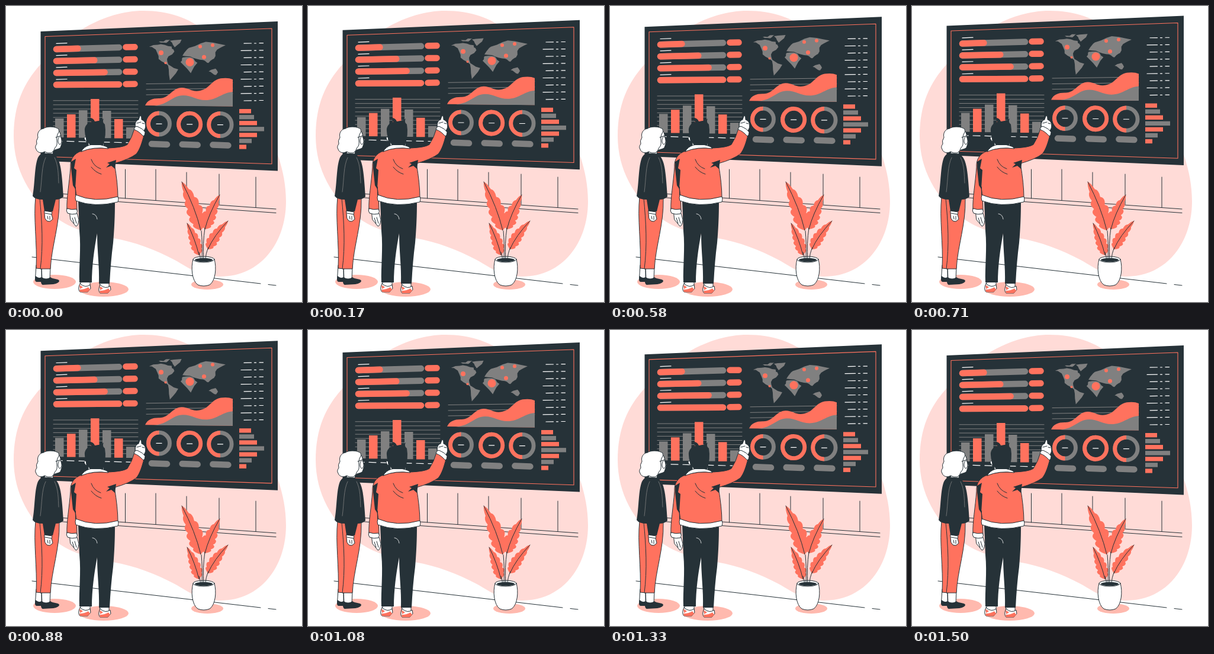
Write an HTML page that moves like this. It is 500x500 px and loops after 1540 ms.

```html
<!DOCTYPE html>
<html lang="en">
<head>
<meta charset="utf-8">
<title>Dashboard wall</title>
<style>
  html, body { margin: 0; width: 100%; height: 100%; overflow: hidden; background: #fff; }
  svg { display: block; width: 100%; height: 100%; }
  path, line, ellipse { stroke-linecap: round; stroke-linejoin: round; }
  .coral { fill: #ff725e; }
  .grey { fill: #808080; }
  .dark { fill: #263238; }
  .white { fill: #fff; }
  .shade { fill: #ffb9ae; }
  .ink { stroke: #263238; stroke-width: 1; }
  .line { fill: none; }
  .chalk { stroke: #fff; stroke-width: 1.2; }
  .rule { stroke: #808080; stroke-width: 1; }
</style>
</head>
<body>
<svg viewBox="0 0 500 500">
  <path fill="#ffdbd7" d="M232 8C275 8 307 20 337 42C390 78 420 150 440 195C452 235 473 275 473 330C473 400 430 457 362 457C327 457 310 443 285 429C250 411 220 399 180 392C140 385 110 376 85 358C40 325 13 275 13 220C13 166 30 130 58 99C100 50 165 8 232 8"/>

  <path class="ink line" d="M201.500 276V325M253 276V328M305 281V331M360 284V335M422 289V340M90 317L456 343M90 323.500L456 349.500M44 424L430 469M443 470.500L456 472"/>
  <g class="shade">
    <ellipse cx="82" cy="466" rx="36" ry="12"/>
    <ellipse cx="165" cy="478.500" rx="42" ry="12.500"/>
    <ellipse cx="340" cy="470.500" rx="27" ry="8.500"/>
  </g>

  <g id="board">
    <path class="dark" d="M58.500 43L459 26V278.500L58.500 261.500Z"/>
    <path class="line" stroke="#ff725e" stroke-width="1.100" d="M66 51.500L449 38V266.700L66 254.500Z"/>
    <g id="charts"></g>
    <path id="map" class="grey"/>
    <g id="spots" class="coral"></g>
    <path class="rule" d="M237 131.500l146 -2M237 141l146 -2M237 150l146 -2"/>
    <path class="coral" d="M235 168C239 159 247 156 258 156C276 157 280 138 297 138C309 138 314 146 328 143C346 139 347 123 366 122Q376 121 383 124V169.500Z"/>
    <path class="grey" d="M250 168.500C274 167 281 151 299 151C315 151 322 160 340 159C359 157 364 147 383 145V169.500Z"/>
  </g>

  <g id="plant"></g>
  <path class="white ink" d="M316 428C312 442 314 464 324 471Q334 475 344 471C354 464 356 442 352 428Z"/>
  <ellipse class="white ink" cx="334" cy="428" rx="18" ry="5"/>
  <ellipse class="dark" cx="334" cy="429" rx="15" ry="3.300"/>
  <path class="ink line" d="M331 430Q332 400 330 380M334 430Q332 400 336 375M337 430Q337 418 342 408M328 430Q329 422 326 416"/>

  <g id="woman">
    <path class="white ink" d="M51 438L49.500 460H60V440ZM60 440L61 462H74L75 440Z"/>
    <path class="dark" d="M50 456C48 462 49 466 52 466H62L60 458Q55 461 50 456ZM60 458C58 465 59 470 62 471L80 470Q90 468 90 464C88 460 79 462 75 458Q68 463 60 458Z"/>
    <path class="coral ink" d="M50 322C46 360 53 400 51 443L61 444L70 325Z"/>
    <path class="coral ink" d="M57 325C61 365 63 405 58 444H75C77 405 91 370 90 325Z"/>
    <path class="dark" d="M62 249L79 250C92 255 94 275 97 322Q92 327 84 327L79 347H65L62 327Q49 327 45 321C49 300 48 270 54 256Q57 250 62 249Z"/>
    <path class="line" stroke="#808080" stroke-width=".8" d="M67 256C60 270 61 292 58 314M82 256C89 270 88 285 89 299"/>
    <path class="white ink" d="M65 346L78 348L77 352L79 360L74 364L69 363L66 359ZM66 350L77 352M70 355L71 360M74 355V361"/>
    <path class="dark" d="M61 245H79V253H60Z"/>
    <path class="white ink" d="M82 210L91 213L95 230L92 239C88 243 84 241 80 245L79 250L65 249Z"/>
    <path class="white ink" d="M63 207C69 203 83 203 89 208Q91 212 87 217Q85 221 86 228Q87 236 83 239Q81 245 77 248Q69 249 65 246C60 250 52 247 51 242Q48 238 52 233Q50 228 54 222C52 215 56 208 63 207Z"/>
    <path class="ink line" d="M84 222L93 219M90 221C87 225 87 232 91 234C95 232 95 224 92 221"/>
  </g>

  <g id="man">
    <path class="white ink" d="M127 462L125 475H142V462ZM159 463L158 478H174V463Z"/>
    <g id="shoe">
      <path class="white ink" d="M125 469C122 475 122 480 125 483H138L143 477L142 471Q134 477 125 469Z"/>
      <path class="coral" d="M124 479Q133 479 139 475L142 479L138 483H125ZM124 471L130 475L125 478Z"/>
    </g>
    <use href="#shoe" x="34" y="2"/>
    <path class="dark" d="M122 330H184C184 355 183 375 181 400Q177 430 175 469H157C158 440 154 415 154 384C149 410 145 440 145 467H124C123 440 127 410 124 380Z"/>
    <path class="line" stroke="#fff" stroke-width=".8" d="M146 351Q153 352 154 360"/>
    <path class="white ink" d="M108 350H120L123 361Q122 372 118 372L109 361ZM112 358L115 367M116 357L119 367"/>
    <path class="white ink" d="M139 225V242H165V225Z"/>
    <path class="coral ink" d="M127 245C145 239 160 240 173 240Q198 239 205 234Q213 222 217 207L233 218C230 230 226 243 220 250Q208 259 183 266Q189 300 189 325Q150 335 118 325L117 305Q120 325 120 346L103 344C102 325 107 300 109 272C108 259 115 249 127 245Z"/>
    <path class="white ink" d="M118 319Q150 333 189 322Q191 326 189 331Q150 341 118 329Q116 324 118 319ZM103 342Q111 345 119 343Q122 347 119 351Q111 353 104 350Q101 346 103 342Z"/>
    <path class="dark" d="M110 263L118 258L115 274L119 277L117 309L113 303L110 275ZM186 260L171 265L175 267L169 273L178 270L184 275Z"/>
    <path class="ink line" d="M144 259Q148 271 160 275M144 272Q151 281 161 284"/>
    <path class="white ink" d="M127 246Q131 238 141 235Q153 232 165 236Q171 237 173 241Q148 237 127 246Z"/>
    <path class="dark" d="M133 211C132 203 138 197 144 196Q141 192 143 189Q148 190 150 195C156 194 161 194 165 190Q162 196 167 200Q170 218 164 235H142Q133 224 133 211Z"/>
    <path class="white ink" d="M135 222C131 219 131 226 136 229Z"/>
    <path class="white ink" d="M219 207C217 200 219 193 224 192L226 186Q229 184 229 192C235 194 237 200 235 207L231 214ZM221 198L228 196M230 198L234 199"/>
    <path class="white ink" d="M217 206Q219 202 223 204Q231 207 235 213Q235 218 232 220Q224 211 217 209Z"/>
  </g>
</svg>
<script>
const byId = id => document.getElementById(id);
const path = (cls, d) => `<path class="${cls}" d="${d}"/>`;
const box = (cls, x, y, w, h) => `<rect class="${cls}" x="${x}" y="${y}" width="${w}" height="${h}"/>`;
const pill = (color, x1, y1, x2, y2) =>
  `<line x1="${x1 + 5}" y1="${y1}" x2="${x2 - 5}" y2="${y2}" stroke="${color}" stroke-width="10.5"/>`;
const times = (n, make) => Array.from({ length: n }, (_, i) => make(i)).join('');
const tint = i => i % 2 ? 'grey' : 'coral';
const CORAL = '#ff725e', GREY = '#808080';

// Values rise to a peak in the middle of seven and fall away on both sides.
const peak = (i, top, before, after) => {
  const d = Math.abs(i - 3);
  const [start, slope] = i < 3 ? before : after;
  return d ? start - slope * d : top;
};

const progress = times(4, i => {
  const left = 73 + 20 * i, right = 70 + 20.8 * i, share = [.4, .64, .79, 1][i];
  return pill(GREY, 80, left, 196, right)
    + pill(CORAL, 80, left, 80 + 116 * share, left + (right - left) * share)
    + pill(CORAL, 197.5, right - .5, 222.5, right - .7)
    + path('chalk', `M85 ${63.3 + 20.3 * i}l18 -.7`);
});
const grid = times(9, i => path('rule', `M80 ${159.8 + 7.1 * i}H223`));
const columns = times(7, i => {
  const x = 83 + 20 * i, height = peak(i, 65, [53, 7], [59, 14]);
  return box(tint(i + 1), x, 222 - height, 14.5, height + i * .3)
    + path('chalk', `M${x} ${228 + i * .45}l12 .4`);
});
const rings = times(3, i => {
  const x = 258.5 + 51.7 * i, y = 199 + .75 * i, r = 18 + .6 * i;
  return `<g fill="none" stroke-width="6.8"><circle cx="${x}" cy="${y}" r="${r}" stroke="${i === 1 ? CORAL : GREY}"/>
    <path stroke="${CORAL}" style="stroke-linecap:butt" d="M${x} ${y - r}a${r} ${r} 0 0 0 0 ${2 * r}"/></g>`
    + path('chalk', `M${x - 4.5} ${y + .2}h9`)
    + pill(GREY, x - 17.5, y + 34, x + 18.5, y + 35);
});
const list = times(9, i => {
  const y = 63 + 12.1 * i;
  return path('chalk', `M${402 - 5 * (i % 2)} ${y + .2}L414.500 ${y}M419.500 ${y}h3M428 ${y - .3}h6.500`);
});
const rows = times(7, i => box(tint(i), 394, 174 + 10.05 * i, peak(i, 42, [35, 5], [39, 9]), 7.3));

// Land masses: a few corners each, joined by a ragged seeded coast.
let seed = 7;
const jitter = size => ((seed = seed * 16807 % 2147483647) / 2147483647 - .5) * size;
function land(corners) {
  const points = corners.split(' ').map(p => p.split(',').map(Number));
  return points.map(([x, y], i) => {
    const [nx, ny] = points[(i + 1) % points.length];
    return times(3, k => `${i + k ? 'L' : 'M'}${x + (nx - x) * k / 3 + jitter(2.4)} ${y + (ny - y) * k / 3 + jitter(2.4)}`);
  }).join('') + 'Z';
}
const continents = [
  '243,68 262,64 279,69 284,77 271,89 274,101 258,90 254,74',
  '257,61 270,58 278,57 270,62',
  '276,59 297,57 286,70',
  '273,99 290,106 278,126',
  '298,87 316,87 323,95 312,113 296,94',
  '299,83 308,70 338,60 370,66 356,74 351,88 342,96 333,92 316,88',
  '343,110 355,105 357,113 353,117',
];

// A scalloped leaf along a quadratic midrib from base to tip.
function leaf(bx, by, cx, cy, tx, ty, width) {
  const at = (t, side, swell) => {
    const u = 1 - t;
    const dx = 2 * u * (cx - bx) + 2 * t * (tx - cx), dy = 2 * u * (cy - by) + 2 * t * (ty - cy);
    const off = side * swell * width * Math.sin(Math.PI * t ** .65) ** .7 / Math.hypot(dx, dy);
    return [u * u * bx + 2 * u * t * cx + t * t * tx - dy * off, u * u * by + 2 * u * t * cy + t * t * ty + dx * off];
  };
  const lobes = 6;
  const right = times(lobes, i => `Q${at((i + .7) / lobes, 1, 1.45)} ${at((i + 1) / lobes, 1, .8)}`);
  const left = times(lobes, i => `Q${at(1 - (i + .3) / lobes, -1, 1.45)} ${at(1 - (i + 1) / lobes, -1, .8)}`);
  return path('coral', `M${bx} ${by}${right}${left}Z`) + path('ink line', `M${bx} ${by}Q${cx} ${cy} ${tx} ${ty}`);
}

byId('charts').innerHTML = progress + grid + columns + rings + list + rows;
byId('map').setAttribute('d', continents.map(land).join(''));
byId('spots').innerHTML = [[262, 79, 4], [269.5, 96.3, 2], [328, 68.5, 3], [349, 66.3, 3], [310.5, 95, 7], [334.5, 86.3, 3.5]]
  .map(([x, y, r]) => `<circle cx="${x}" cy="${y}" r="${r}"/>`).join('');
byId('plant').innerHTML = leaf(329, 379, 320, 341, 297, 297, 13) + leaf(336, 377, 342, 352, 361, 319, 11)
  + leaf(326, 421, 320, 395, 306, 367, 9) + leaf(341, 411, 351, 388, 375, 363, 9);

// The board bobs 10 px up and back every 36 steps at 24 steps a second.
const LOOP = 1540, PERIOD = 36, RISE = 10, PHASE = .5;
const lift = step => {
  const p = (step + PHASE) % PERIOD / PERIOD;
  return RISE * (1 - Math.abs(1 - 2 * p));
};
function draw(now) {
  const step = Math.floor((now % LOOP + 5) * .024);
  byId('board').setAttribute('transform', `translate(0 ${lift(0) - lift(step)})`);
  requestAnimationFrame(draw);
}
requestAnimationFrame(draw);
</script>
</body>
</html>
```
